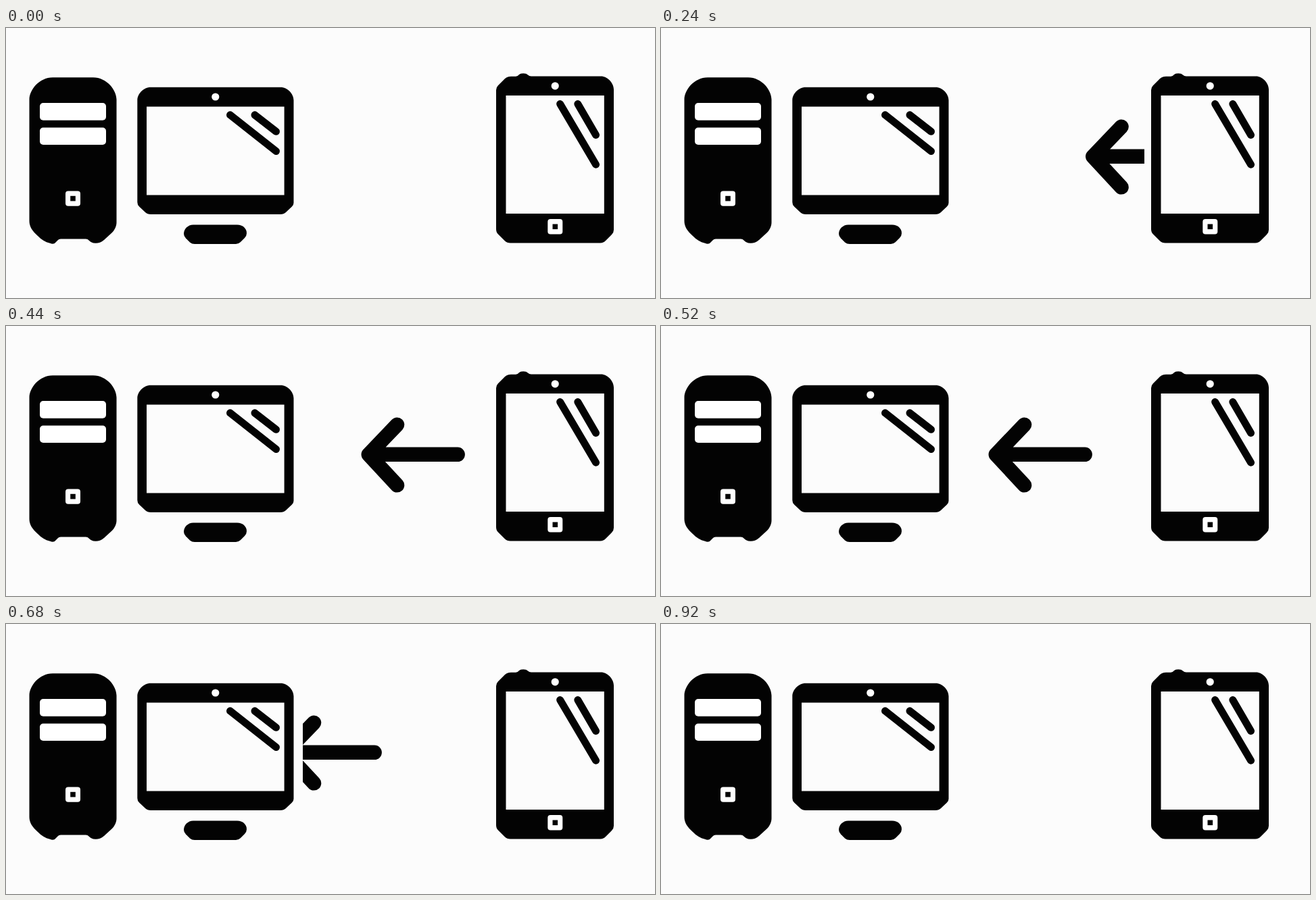
These frames come from a looping animation (960 px wide and 400 px high, 0.96 s). An HTML page:

```html
<!DOCTYPE html>
<html lang="en">
<head>
<meta charset="utf-8">
<title>Phone to computer transfer</title>
<style>
  html, body { margin: 0; width: 100%; height: 100%; overflow: hidden; background: #fcfcfc; }
  svg { display: block; width: 960px; height: 400px; }
  .line { fill: none; stroke: #030303; stroke-linecap: round; stroke-linejoin: round; }
  .glare { stroke-width: 11; }
  .arrow { stroke-width: 21.6; }
  .paper { fill: #fcfcfc; }
  .white { fill: #fff; }
</style>
</head>
<body>
<svg viewBox="0 0 960 400" fill="#030303">
  <defs>
    <clipPath id="gap"><rect x="439" y="120" width="276" height="140"/></clipPath>
    <g id="button">
      <rect class="white" width="22" height="22.4" rx="4"/>
      <rect x="7.2" y="7.4" width="7.6" height="7.6"/>
    </g>
  </defs>

  <g id="tower">
    <path d="M34.5 106 C34.5 92 49 73.3 69 73.3 H129 C149 73.3 163.5 92 163.5 106
      V288 C163.5 293 161 299 157 303 L145 314 C141 317.5 137 318.8 133 318.8
      C128 319 125 317 122.5 314.5 Q121 312.5 118 312.5 H81 Q78 312.5 76.5 314.5
      L72 319 Q69 320.5 65 318.8 C58 317 52 313.5 47 308 C39 301 34.5 294 34.5 286 Z"/>
    <rect class="white" x="50" y="111" width="98" height="25.8" rx="5"/>
    <rect class="white" x="50" y="147.5" width="98" height="25.5" rx="5"/>
    <use href="#button" x="88" y="241.4"/>
  </g>

  <g id="monitor">
    <path d="M194.3 107 C194.3 98 203 87.8 214 87.8 H406 C417 87.8 425.5 98 425.5 107
      V259 Q425.5 262 423 264.5 L414 273 Q411 276 406 276 H214 Q209 276 206 273
      L197 264.5 Q194.3 262 194.3 258 Z"/>
    <rect class="paper" x="208" y="116.5" width="203.6" height="131"/>
    <circle class="white" cx="309.8" cy="102" r="5.6"/>
    <path class="line glare" d="M331.5 128.8 L399.5 182.5 M368 128.8 L399.5 153.3"/>
    <path d="M277 291.6 H342 C350 291.6 356 297 356 304 Q356 308 353 311 L347 317
      Q344 320 340 320 H279 Q275 320 272 317.5 L266 311.5 Q263 308.5 263 305
      C263 298 269 291.6 277 291.6 Z"/>
  </g>

  <g id="phone">
    <path d="M725 92 Q725 88 728 85 L738 75 Q742 71.7 747 71.7 H754 Q757 71.5 759 69
      Q761 67.2 765.5 67.2 Q770 67.2 772 69.5 Q774 71.6 777 71.6 H880
      C890 71.6 899 82 899 91 V299 Q899 303 896 306 L887 315 Q884 318.4 879 318.4
      H746 Q741 318.4 738 315.5 L728 305.5 Q725 302.5 725 298 Z"/>
    <rect class="paper" x="739.5" y="100" width="145.3" height="175"/>
    <circle class="white" cx="812.2" cy="85.8" r="5.6"/>
    <path class="line glare" d="M819.6 112.5 L872.5 202.3 M845.8 112.5 L872.5 158.5"/>
    <use href="#button" x="801.3" y="283.1"/>
  </g>

  <g clip-path="url(#gap)">
    <path id="arrow" class="line arrow" d="M53 146.2 L10.8 190.4 L53 235.8 M10.8 190.3 H142.6"/>
  </g>
</svg>
<script>
  const LOOP = 960, STEP = 40, SHIFT = 20.5;
  const arrow = document.getElementById('arrow');

  // The tip touches the monitor side of the gap at 600 ms.
  function draw(ms) {
    const step = Math.floor((ms % LOOP) / STEP);
    const tip = 443.5 + (15 - step) * SHIFT;
    arrow.setAttribute('transform', `translate(${tip} 0)`);
  }

  let start = null;
  function tick(now) {
    if (start === null) start = now;
    draw(now - start);
    requestAnimationFrame(tick);
  }
  draw(0);
  requestAnimationFrame(tick);
</script>
</body>
</html>
```
